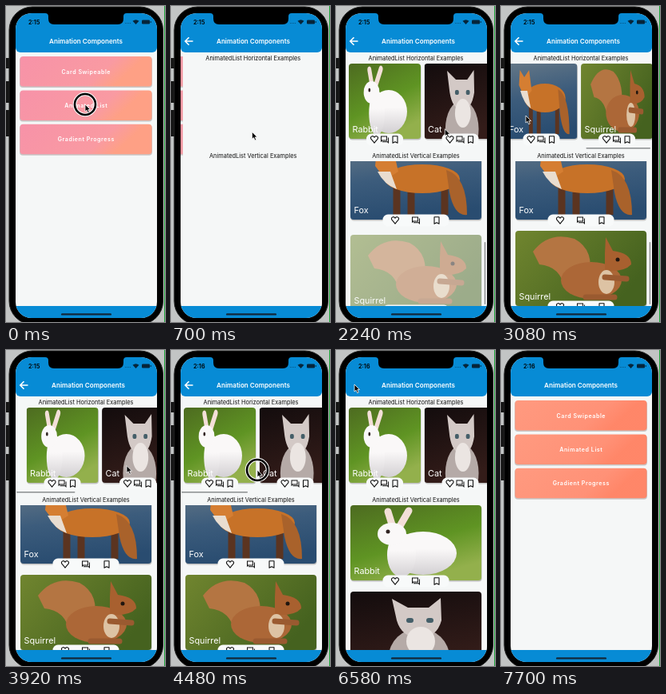
These frames come from a looping animation (199 px wide and 395 px high, 7.84 s). An HTML page:

```html
<!DOCTYPE html>
<html lang="en">
<head>
<meta charset="utf-8">
<title>Animation Components</title>
<style>
  html, body { margin: 0; width: 100%; height: 100%; overflow: hidden; background: #c2c4c4; }
  svg { display: block; width: 199px; height: 395px; font-family: Inter, Roboto, sans-serif; }
  .mid { text-anchor: middle; }
  .bar { fill: #8b8e8f; }
  .line { fill: none; stroke: #111; stroke-width: 1.1; stroke-linejoin: round; }
</style>
</head>
<body>
<svg viewBox="0 0 199 395">
  <defs>
    <linearGradient id="warm" x2="1" y2=".25">
      <stop/><stop offset=".7"/><stop offset=".9"/>
    </linearGradient>
    <linearGradient id="meadow" x2=".5" y2="1">
      <stop stop-color="#4d6b20"/><stop offset=".6" stop-color="#5f9423"/><stop offset="1" stop-color="#93b04c"/>
    </linearGradient>
    <linearGradient id="night" x2=".3" y2="1">
      <stop stop-color="#130c0d"/><stop offset="1" stop-color="#331c19"/>
    </linearGradient>
    <linearGradient id="frost" x2=".2" y2="1">
      <stop stop-color="#647787"/><stop offset=".5" stop-color="#3c5c7c"/><stop offset="1" stop-color="#294c70"/>
    </linearGradient>
    <linearGradient id="moss" x2="1" y2=".5">
      <stop stop-color="#70852f"/><stop offset="1" stop-color="#45621f"/>
    </linearGradient>
    <linearGradient id="fur" x2="0" y2="1">
      <stop offset=".4" stop-color="#faf8f8"/><stop offset="1" stop-color="#d3d0d3"/>
    </linearGradient>

    <symbol id="rabbit" viewBox="0 0 164 94" preserveAspectRatio="none">
      <path fill="url(#meadow)" d="M0 0H164V94H0Z"/>
      <path stroke="#f3dfd8" stroke-width="9" stroke-linecap="round" d="M52 24L47 8M62 26L73 7"/>
      <ellipse cx="91" cy="60" rx="42" ry="27" fill="url(#fur)"/>
      <ellipse cx="64" cy="62" rx="18" ry="28" fill="url(#fur)"/>
      <ellipse cx="52" cy="36" rx="18" ry="14" fill="#faf8f8"/>
      <circle cx="47" cy="33" r="2.5" fill="#302321"/>
    </symbol>
    <symbol id="cat" viewBox="0 0 164 94" preserveAspectRatio="none">
      <path fill="url(#night)" d="M0 0H164V94H0Z"/>
      <ellipse cx="86" cy="82" rx="38" ry="36" fill="#b5aaa7"/>
      <path fill="#d3c9c6" d="M58 36L52 9L72 20H98L113 8L114 36Q108 58 86 58Q64 57 58 36Z"/>
      <ellipse cx="88" cy="62" rx="18" ry="18" fill="#ebe5e2"/>
      <path stroke="#455f69" stroke-width="6" stroke-linecap="round" d="M73 36h3M98 36h3"/>
    </symbol>
    <symbol id="fox" viewBox="0 0 164 94" preserveAspectRatio="none">
      <path fill="url(#frost)" d="M0 0H164V94H0Z"/>
      <path stroke="#5b3420" stroke-width="9" d="M58 50V88M76 50V88M118 50V88"/>
      <ellipse cx="90" cy="43" rx="47" ry="18" fill="#c77228"/>
      <path fill="#a9622b" d="M120 32Q146 40 146 88Q130 90 124 60Z"/>
      <path fill="#d57e32" d="M31 27L33 8L43 17L54 8L60 34L44 44Z"/>
      <path fill="#e9ddd0" d="M34 34H50L58 56Q42 50 34 34Z"/>
    </symbol>
    <symbol id="squirrel" viewBox="0 0 164 94" preserveAspectRatio="none">
      <path fill="url(#moss)" d="M0 0H164V94H0Z"/>
      <path fill="#b47542" d="M22 26Q42 0 74 10Q100 24 92 60L62 72Q56 44 30 42Z"/>
      <ellipse cx="95" cy="62" rx="38" ry="23" fill="#ac6737"/>
      <path fill="#a8602f" d="M112 28L113 8L122 25Q145 28 145 42Q136 52 112 50Z"/>
      <ellipse cx="114" cy="64" rx="10" ry="15" fill="#ddc3a4"/>
      <path stroke="#9a5a30" stroke-width="7" stroke-linecap="round" d="M112 58L139 60M88 83H124"/>
      <circle cx="128" cy="36" r="2.5" fill="#20150f"/>
    </symbol>

    <path id="heart" class="line" d="M0 4.2C-3-.1-4.7-.5-4.6-2.3C-4.4-4.8-1.2-5 0-2.8C1.2-5 4.4-4.8 4.6-2.3C4.7-.5 3-.1 0 4.2Z"/>
    <g id="chat"><path fill="#111" d="M-5-4.5H3V1.5H-3L-5 3.2ZM4-2.5H5V5L3.2 3.2H-3V2.2H4Z"/><path fill="#fff" d="M-4-3.5H2V.6H-4Z"/></g>
    <path id="mark" class="line" d="M-3-4.3H3V4.3L0 2.7L-3 4.3Z"/>

    <clipPath id="screen"><rect x="12" y="9" width="177" height="381" rx="20"/></clipPath>
    <clipPath id="rowArea"><path d="M12 71H189V180H12Z"/></clipPath>
    <clipPath id="columnArea"><path d="M12 194H189V376H12Z"/></clipPath>
    <clipPath id="clip90"><rect width="90" height="94" rx="4"/></clipPath>
    <clipPath id="clip164"><rect width="164" height="94" rx="4"/></clipPath>
  </defs>

  <path fill="#c2c4c4" d="M0 0H199V395H0Z"/>
  <path fill="#151515" d="M0 65H4V78H0ZM0 94H4V121H0ZM0 130H4V163H0Z"/>
  <path fill="#20a83c" d="M198 0H199V395H198Z"/>
  <rect x="4" y="1" width="192.5" height="397" rx="29" stroke="#222"/>

  <g clip-path="url(#screen)">
    <path fill="#f5f7f7" d="M12 9H189V390H12Z"/>
    <g id="home"></g>
    <g id="list">
      <path fill="#f5f7f7" d="M12 50H189V376H12Z"/>
      <g class="mid" font-size="7.4" fill="#111">
        <text x="100" y="67.7">AnimatedList Horizontal Examples</text>
        <text x="100" y="189.7">AnimatedList Vertical Examples</text>
      </g>
      <g id="row" clip-path="url(#rowArea)"></g>
      <g id="column" clip-path="url(#columnArea)"></g>
      <rect id="hbar" class="bar" y="177" height="1.5" rx=".7"/>
      <rect id="vbar" class="bar" x="185.7" width="1.5" rx=".7"/>
    </g>
    <rect x="12" y="0" width="177" height="58" rx="6" fill="#078bd5"/>
    <path fill="#078bd5" d="M12 375H189V390H12Z"/>
    <path d="M49 9Q53 9 53 13V16Q53 23 60 23H140Q147 23 147 16V13Q147 9 151 9Z"/>
    <rect x="69" y="384.2" width="63" height="2.4" rx="1.2" fill="#12283a"/>
    <text id="clock" x="28" y="22.7" font-size="7.3" font-weight="600"></text>
    <g fill="#06253a">
      <path fill="none" stroke="#06253a" stroke-dasharray="1" opacity=".5" d="M149 21.5h7"/>
      <path d="M158.5 18.8Q162.5 15.6 166.5 18.8L162.5 23Z"/>
      <rect x="170" y="17.5" width="10" height="5" rx="1.3"/>
      <path d="M180.7 19h1v2h-1z"/>
    </g>
    <text id="title" class="mid" x="100" y="47" font-size="8.1" font-weight="600" fill="#fff">Animation Components</text>
    <path id="back" fill="none" stroke="#fff" stroke-width="1.6" d="M27.5 44H18M22.5 39.3L17.8 44L22.5 48.7"/>
  </g>

  <g id="pointer">
    <g id="ring" fill="none">
      <circle r="13" stroke="#fff" stroke-width="4.6"/><circle r="13" stroke="#000" stroke-width="2.6"/>
    </g>
    <path stroke="#fff" stroke-width=".8" d="M0 0V9L2.1 7.2L3.7 10.7L5.3 10L3.8 6.6H6.6Z"/>
  </g>
</svg>

<script>
const LOOP = 7840, STEP = 140, MOVE = 560, HOLD = 420;
const MAX_X = 197, MAX_Y = 237;
// Start times of the gestures
const OPEN = 0, DOWN = 1400, RIGHT = 2520, LEFT = 3360, UP = 4480, CLOSE = 6020;
const gestures = [OPEN, DOWN, RIGHT, LEFT, UP, CLOSE];

const $ = id => document.getElementById(id);
const moveTo = (el, x, y) => el.setAttribute('transform', `translate(${x} ${y})`);
const set = (el, attrs) => { for (const k in attrs) el.setAttribute(k, attrs[k]); };
const progress = (t, start, length = MOVE) => Math.min(1, Math.max(0, (t - start) / length));
const smooth = p => p * p * (3 - 2 * p);
const easeOut = p => 1 - (1 - p) ** 3;
const animals = ['Rabbit', 'Cat', 'Fox', 'Squirrel'];

$('home').innerHTML = ['Card Swipeable', 'Animated List', 'Gradient Progress'].map((label, i) => {
  const y = 63 + i * 42.4;
  return `<rect x="17" y="${y + 1}" width="166" height="38" rx="4" fill="#b8b4b4" opacity=".75"/>
    <rect x="17.5" y="${y}" width="165" height="37.5" rx="4" fill="url(#warm)"/>
    <text class="mid" x="100.3" y="${y + 21.5}" font-size="7.1" font-weight="600" letter-spacing=".55" fill="#fff">${label}</text>`;
}).join('');

function card(name, width, gap) {
  const middle = width / 2, tab = width / 2 + 1;
  const icons = ['heart', 'chat', 'mark'].map((id, i) =>
    `<use href="#${id}" x="${middle + (i - 1) * gap}" y="95"/>`).join('');
  return `<g><rect x=".5" y="1" width="${width}" height="94.5" rx="4" fill="#aaa" opacity=".7"/>
    <g clip-path="url(#clip${width})"><use href="#${name.toLowerCase()}" width="${width}" height="94"/></g>
    <text x="4.5" y="85.8" font-size="10.8" fill="#fff">${name}</text>
    <rect x="${middle - tab / 2}" y="87.5" width="${tab}" height="15" rx="6.5" fill="#f8fafa"/>${icons}</g>`;
}
$('row').innerHTML = animals.map(name => card(name, 90, 13)).join('');
$('column').innerHTML = animals.map(name => card(name, 164, 26)).join('');

const stops = [...$('warm').children];
const cool = ['#f792a8', '#f99aa2', '#fea085'], hot = ['#ff9a7f', '#ff9176', '#ff8668'];

// A swipe that runs past the end and springs back
function swipe(t, start, distance, overshoot) {
  return distance * smooth(progress(t, start)) +
    overshoot * Math.sin(Math.PI * progress(t, start + HOLD));
}

// Scroll bar thumb, squeezed while overscrolled
function thumb(scroll, max, start, room, full) {
  const size = full - Math.max(0, -scroll, scroll - max);
  return [start + Math.min(1, Math.max(0, scroll / max)) * (room - size), size];
}

// Scroll bars appear with a swipe and linger after the last one
const barOpacity = (t, from, last) => progress(t, from, STEP) * (1 - progress(t, last + 1700, 2 * STEP));

// Pointer stops: time, x, y
const path = [
  [OPEN + HOLD, 99, 123], [DOWN, 111, 296], [DOWN + HOLD, 111, 190],
  [RIGHT, 150, 134], [RIGHT + HOLD, 31, 136], [LEFT, 31, 140], [LEFT + HOLD, 156, 144],
  [UP, 108, 150], [UP + HOLD, 108, 244], [5600, 108, 244], [CLOSE, 23, 43],
];
function pointerAt(t) {
  const i = path.findIndex(([time]) => time > t);
  if (i < 1) return (i ? path[path.length - 1] : path[0]).slice(1);
  const [t0, x0, y0] = path[i - 1], [t1, x1, y1] = path[i];
  const p = smooth(progress(t, t0, t1 - t0));
  return [x0 + (x1 - x0) * p, y0 + (y1 - y0) * p];
}

function render(time) {
  const t = Math.floor(time % LOOP / STEP) * STEP;

  stops.forEach((stop, i) =>
    stop.style.stopColor = `color-mix(in srgb, ${cool[i]}, ${hot[i]} ${t / LOOP * 100}%)`);

  const page = easeOut(progress(t, OPEN + 280)) - easeOut(progress(t, CLOSE + MOVE));
  moveTo($('home'), -50 * page, 0);
  moveTo($('list'), 177 * (1 - page), 0);
  moveTo($('title'), 3 * page, 0);
  $('back').style.opacity = page * (1 - progress(t, CLOSE + HOLD, STEP));
  $('clock').textContent = t < 4200 ? '2:15' : '2:16';

  const sx = swipe(t, RIGHT, MAX_X, 3.5) + swipe(t, LEFT, -MAX_X, -13.5);
  const sy = swipe(t, DOWN, MAX_Y, 0) + swipe(t, UP, -MAX_Y, -12.7);
  animals.forEach((_, i) => {
    const shown = smooth(progress(t, 700 + i * HOLD));
    const h = $('row').children[i], v = $('column').children[i];
    moveTo(h, 16 + i * 94.5 - sx, 72 - 10 * (1 - shown));
    moveTo(v, 18, 194 + i * 108 - sy + 10 * (1 - shown));
    h.style.opacity = v.style.opacity = shown;
  });

  const [x, width] = thumb(sx, MAX_X, 13, 174, 83);
  set($('hbar'), { x, width, opacity: barOpacity(t, RIGHT, LEFT) });
  const [y, height] = thumb(sy, MAX_Y, 195, 178, 78);
  set($('vbar'), { y, height, opacity: Math.max(barOpacity(t, DOWN, DOWN), barOpacity(t, UP, UP)) });

  moveTo($('pointer'), ...pointerAt(t));
  $('ring').style.opacity = gestures.some(start => t >= start && t < start + HOLD) ? 1 : 0;
  $('pointer').style.opacity = 1 - progress(t, 7000, HOLD);
}

function tick() {
  render(performance.now());
  requestAnimationFrame(tick);
}
tick();
</script>
</body>
</html>
```
